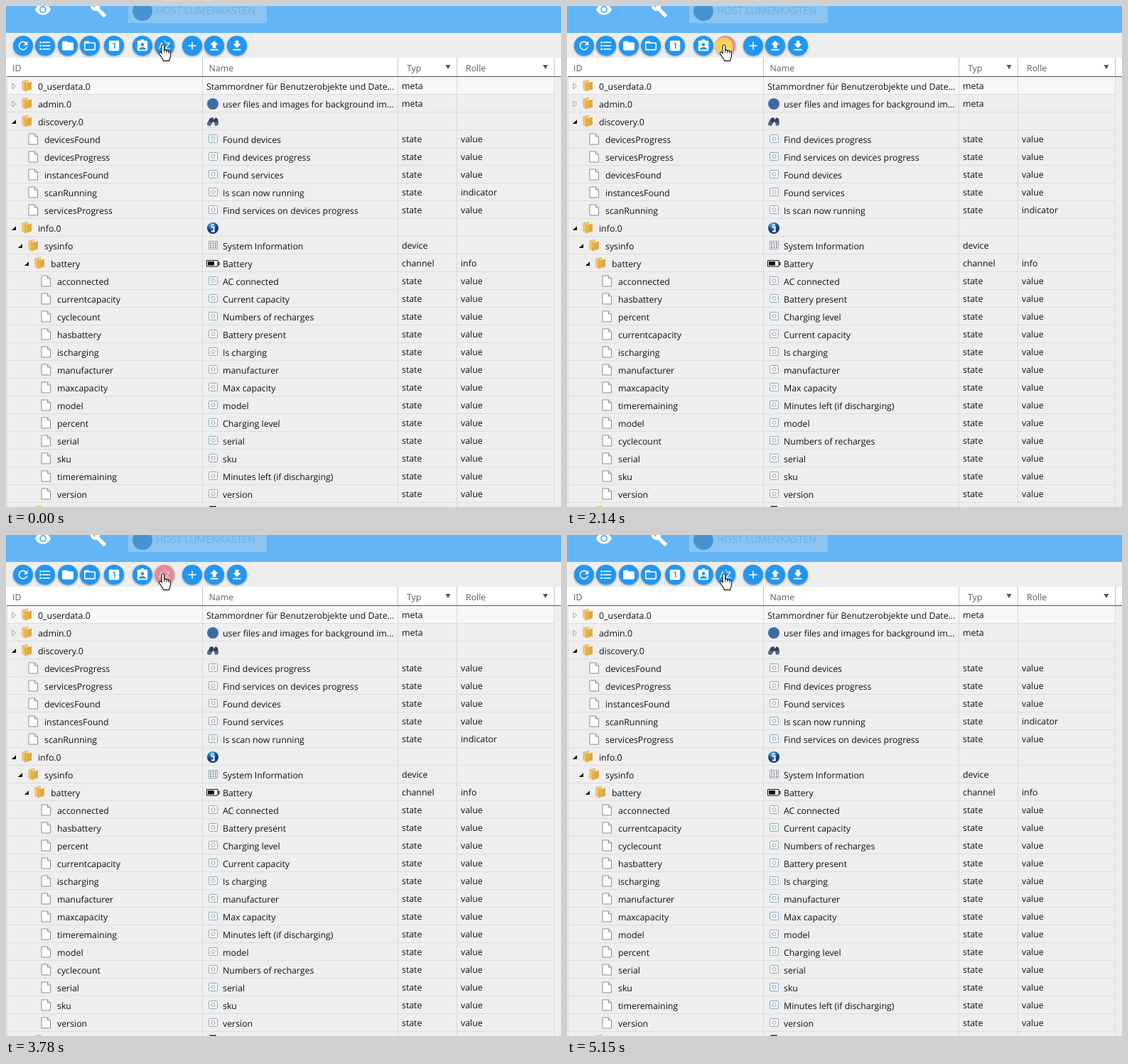
Recreate the animation shown at these times as an HTML page. Size 781x706 px, loop 5.64 s.

```html
<!DOCTYPE html>
<html lang="de">
<head>
<meta charset="utf-8">
<style>
  html, body { margin: 0; width: 100%; height: 100%; overflow: hidden; background: #eee; }
  svg { display: block; }
  text { font: 12.35px "Open Sans", "Noto Sans", sans-serif; fill: #111; text-rendering: geometricPrecision; white-space: pre; }
  .head { fill: #5c5c5c; }
  .btn { fill: #2196f3; filter: drop-shadow(0 1.5px 1.5px rgba(0, 0, 0, .38)); }
</style>
</head>
<body>
<svg id="stage" width="781" height="706" viewBox="0 0 781 706">
  <defs>
    <linearGradient id="gold"><stop stop-color="#f8dc87"/><stop offset="1" stop-color="#dca034"/></linearGradient>
    <radialGradient id="orb" cx=".4" cy=".25"><stop stop-color="#8fd0f5"/><stop offset=".5" stop-color="#2478c0"/><stop offset="1" stop-color="#123b70"/></radialGradient>
    <clipPath id="round"><circle cx="223" cy="56" r="14"/></clipPath>
    <g id="folder">
      <path d="M-6.5-6.5 1-8.5V5.5L-6.5 4z" fill="#f3cf72" stroke="#d7a84a" stroke-width=".6"/>
      <path d="M0-4 6.5-6V5L0 7z" fill="#e2a83f"/>
      <path d="M-6.5-6.5-1-4V8L-6.5 5z" fill="url(#gold)" stroke="#d9ab4e" stroke-width=".6"/>
    </g>
    <g id="file" stroke="#8d8d8d">
      <path d="M-6-7.5H2.5L6.5-3.5V7.5H-6z" fill="#fff"/>
      <path d="M2.5-7.5V-3.5H6.5" fill="#e2e2e2"/>
    </g>
    <path id="closed" d="M-2-4 2.5 0-2 4z" fill="#fff" stroke="#999"/>
    <path id="open" d="M3-2.7V3H-3.2z" fill="#111"/>
    <g id="state" fill="none" stroke="#93aab7">
      <rect x="-5.5" y="-6.5" width="12" height="11" rx="1" fill="#f3f6f8"/>
      <circle cx=".5" cy="-1" r="2.5"/>
    </g>
    <circle id="admin" r="8" fill="#3d6ca5"/>
    <g id="discovery" fill="#35415e">
      <path d="M-8 3-4-5 0-6 2-2-4 6z"/><path d="M0-1 4-6 7-4 8 3 4 6 2 1z"/>
      <circle cx="-5" cy="3" r="3" fill="#59688c"/><circle cx="5" cy="3" r="2.6" fill="#59688c"/>
    </g>
    <g id="info">
      <circle r="8" fill="url(#orb)"/>
      <path d="M-2-1.5H1.5V4H2.5M-2.2 4.4H2.8M-.5-5H1.5" stroke="#fff" stroke-width="2" fill="none"/>
    </g>
    <g id="device">
      <rect x="-5.5" y="-6.5" width="12" height="11" fill="#f5f7f8" stroke="#93aab7"/>
      <path d="M-3-5V3M.5-5V3M4-5V3" stroke="#63737e" stroke-width="1.6" stroke-dasharray="2 1"/>
    </g>
    <g id="battery">
      <path d="M-8.5-4.5H7V4H-8.5zM8-2H9V2H8z" fill="#fff" stroke="#111"/>
      <path d="M-7-3H2V2.5H-7z" fill="#111"/>
    </g>
    <path id="bars" d="M-5-8.5H5V-6H-5z" fill="#222" stroke="#eee" stroke-dasharray="1 2"/>
  </defs>
  <path d="M0 0H781V38H0z" fill="#64b5f6"/>
  <path d="M172 0H367V24H172z" fill="#8ac4f2"/>
  <circle cx="192" cy="7" r="14" fill="#4793d2"/>
  <text x="211" y="11" style="font-size:14px;fill:#6bb0e6">HOST LUMENKASTEN</text>
  <g id="bar"></g>
  <path d="M0 73H781V99H0z" fill="#fff"/>
  <path d="M2 100H771V125H2z" fill="#f7f7f7"/>
  <g id="rows"></g>
  <g id="byId"></g>
  <g id="byName"></g>
  <path d="M1.5 100V706M276.5 100V706M551.5 100V706M634.5 100V706M771.5 100V706" stroke="#d9d9d9"/>
  <path d="M276.5 73V99M551.5 73V99M634.5 73V99M771.5 73V99" stroke="#c4c4c4"/>
  <path d="M1 99.5H781" stroke="#555"/>
  <path d="M618.5 83h7l-3.5 6zM755.5 83h7l-3.5 6z" fill="#555"/>
  <g clip-path="url(#round)"><circle id="ripple" cx="221" cy="57" fill="#ffeb3b"/></g>
  <path d="M219 56.5c0-2.6 3.6-2.6 3.6 0v6.3c.4-1.3 3-1.2 3.2.5.8-1 2.7-.7 2.9.8.9-.7 2.7-.3 2.7 1.5v5.4c0 2.5-1.8 3.5-1.8 6.4h-8.4c0-2.2-1.2-3.4-2.4-5.2l-3.2-5c-1-1.8 1.3-3.2 2.6-1.6l.8 1.2z" fill="#fff" stroke="#111" stroke-width="1.1"/>
  <path d="M222.6 62v4M225.8 63v3.5M228.7 64v3" stroke="#111" stroke-width=".9"/>
</svg>
<script>
const $ = id => document.getElementById(id);
const use = (id, x, y) => `<use href="#${id}" x="${x}" y="${y}"/>`;
const text = (x, y, s, cls = '') => `<text x="${x}" y="${y}" class="${cls}">${s}</text>`;
const icon = (d, x, y, scale) =>
  `<path d="${d}" fill="#fff" fill-rule="evenodd" transform="translate(${x} ${y}) scale(${scale}) translate(-12 -12)"/>`;

// Toolbar
const box = 'M19 3H5c-1.1 0-2 .9-2 2v14c0 1.1.9 2 2 2h14c1.1 0 2-.9 2-2V5c0-1.1-.9-2-2-2z';
const folder = 'M10 4H4c-1.1 0-2 .9-2 2v12c0 1.1.9 2 2 2h16c1.1 0 2-.9 2-2V8c0-1.1-.9-2-2-2h-8z';
const buttons = {
  24: 'M17.65 6.35A8 8 0 1 0 19.73 14h-2.08A6 6 0 1 1 12 6c1.66 0 3.14.69 4.22 1.78L13 11h7V4z',
  55: 'M2.5 4.5h3v3h-3zm0 6h3v3h-3zm0 6h3v3h-3zM7 5h14v2H7zm0 6h14v2H7zm0 6h14v2H7z',
  87: folder,
  118: folder + 'M4 8v10h16V8z',
  152: box + 'M14 17h-2V9h-2V7h4z',
  192: box + 'M9 3a3 2.5 0 0 1 6 0zM12 7a3 3 0 1 0 0 6 3 3 0 0 0 0-6zM18 19H6v-1.4c0-2 4-3.1 6-3.1s6 1.1 6 3.1z',
  223: 'M14.94 4.66h-4.72l2.36-2.36zM10.25 19.37h4.66l-2.33 2.33zM6.1 6.27L1.6 17.73h1.84l.92-2.45h5.11l.92 2.45h1.84L7.74 6.27zM4.97 13.64l1.94-5.18 1.94 5.18zM15.73 16.14h6.12v1.59h-8.53v-1.29l5.92-8.56h-5.88v-1.6h8.3v1.26z',
  262: 'M19 13h-6v6h-2v-6H5v-2h6V5h2v6h6z',
  293: 'M9 16h6v-6h4l-7-7-7 7h4zM5 18h14v2H5z',
  325: 'M19 9h-4V3H9v6H5l7 7 7-7zM5 18v2h14v-2z'
};
$('bar').innerHTML =
  icon('M12 4.5C7 4.5 2.73 7.61 1 12c1.73 4.39 6 7.5 11 7.5s9.27-3.11 11-7.5c-1.73-4.39-6-7.5-11-7.5zM12 17a5 5 0 1 1 0-10 5 5 0 0 1 0 10zM12 9a3 3 0 1 0 0 6 3 3 0 0 0 0-6z', 52, 5, 1) +
  icon('M22.7 19l-9.1-9.1c.9-2.3.4-5-1.5-6.9-2-2-5-2.4-7.4-1.3L9 6 6 9 1.6 4.7C.4 7.1.9 10.1 2.9 12.1c1.9 1.9 4.6 2.4 6.9 1.5l9.1 9.1c.4.4 1 .4 1.4 0l2.3-2.3c.5-.4.5-1.1.1-1.4z', 130, 5, 1) +
  Object.entries(buttons).map(([x, d]) =>
    `<g id="b${x}"><circle class="btn" cx="${x}" cy="56" r="14"/>${icon(d, x, 56, .8)}</g>`).join('');

// Tree: level, id, name, type, role, expander, icon
const row = (i, [level, id, name, type = '', role = '', expander, mark = 'state']) => {
  const y = 113 + 25 * i, x = 9 * level;
  return (expander ? use(expander, 11 + x, y) : '') +
    use(expander || id === '' ? 'folder' : 'file', (expander || id === '' ? 29.5 : 29) + x, y - .5) +
    (mark ? use(mark, 291, y) : '') + text(45 + x, y + 5, id) +
    text(mark ? 305 : 282, y + 5, name) + text(557, y + 4, type) + text(640, y + 4, role);
};
const fixed = {
  0: [0, '0_userdata.0', 'Stammordner für Benutzerobjekte und Date...', 'meta', '', 'closed', ''],
  1: [0, 'admin.0', 'user files and images for background im...', 'meta', '', 'closed', 'admin'],
  2: [0, 'discovery.0', '', '', '', 'open', 'discovery'],
  8: [0, 'info.0', '', '', '', 'open', 'info'],
  9: [1, 'sysinfo', 'System Information', 'device', '', 'open', 'device'],
  10: [2, 'battery', 'Battery', 'channel', 'info', 'open', 'battery'],
  24: [2, '', '', '', '', '', 'bars']
};
const states = (level, list) => list.split(',').map(s => {
  const [id, name] = s.split(':');
  return [level, id, name || id, 'state', id === 'scanRunning' ? 'indicator' : 'value'];
});
const discovery = states(1, 'devicesFound:Found devices,devicesProgress:Find devices progress,instancesFound:Found services,scanRunning:Is scan now running,servicesProgress:Find services on devices progress');
const battery = states(3, 'acconnected:AC connected,currentcapacity:Current capacity,cyclecount:Numbers of recharges,hasbattery:Battery present,ischarging:Is charging,manufacturer,maxcapacity:Max capacity,model,percent:Charging level,serial,sku,timeremaining:Minutes left (if discharging),version');

const lines = Array.from({ length: 25 }, (_, i) => `M2 ${124.5 + 25 * i}H771`).join('');
$('rows').innerHTML = `<path d="${lines}" stroke="#dedede"/>` +
  text(9, 92, 'ID', 'head') + text(285.5, 92, 'Name', 'head') +
  text(564, 92, 'Typ', 'head') + text(647, 92, 'Rolle', 'head') +
  Object.entries(fixed).map(([i, r]) => row(+i, r)).join('');
const fill = (group, column) => {
  const draw = (list, start) => [...list].sort((a, b) => a[column].localeCompare(b[column], 'en'))
    .map((r, i) => row(start + i, r)).join('');
  $(group).innerHTML = draw(discovery, 3) + draw(battery, 11);
};
fill('byId', 1);
fill('byName', 2);

// Each click: start, end, hold of the first pose, steps
const clicks = [[790, 1150, 60, 6], [2140, 2530, 120, 6], [3450, 3780, 70, 6], [4770, 5150, 50, 7]];
const blue = [33, 150, 243], red = [228, 141, 151];
const [sortDisc, sortIcon] = $('b223').children;

function render(t) {
  const n = clicks.filter(c => t >= c[0]).length;
  let step = 9, p = 1;
  if (n) {
    const [start, end, hold, steps] = clicks[n - 1];
    const u = (t - start - hold) / (end - start - hold);
    step = u < 0 ? 0 : Math.min(steps - 1, 1 + Math.floor(u * (steps - 2)));
    p = step / (steps - 1);
  }
  const toName = n % 2 === 1;
  const mix = toName ? p : 1 - p;
  const named = step >= 2 ? toName : !toName;
  $('byName').style.display = named ? '' : 'none';
  $('byId').style.display = named ? 'none' : '';
  sortDisc.style.fill = `rgb(${blue.map((v, i) => v + (red[i] - v) * mix)})`;
  sortIcon.style.opacity = .9 - .4 * mix;
  $('ripple').setAttribute('r', (toName ? 16 : 12.5) + 8 * p);
  $('ripple').style.opacity = (toName ? .55 : .72) * (1 - p);
}
const begin = performance.now();
(function loop() {
  render((performance.now() - begin) % 5640);
  requestAnimationFrame(loop);
})();
</script>
</body>
</html>
```
